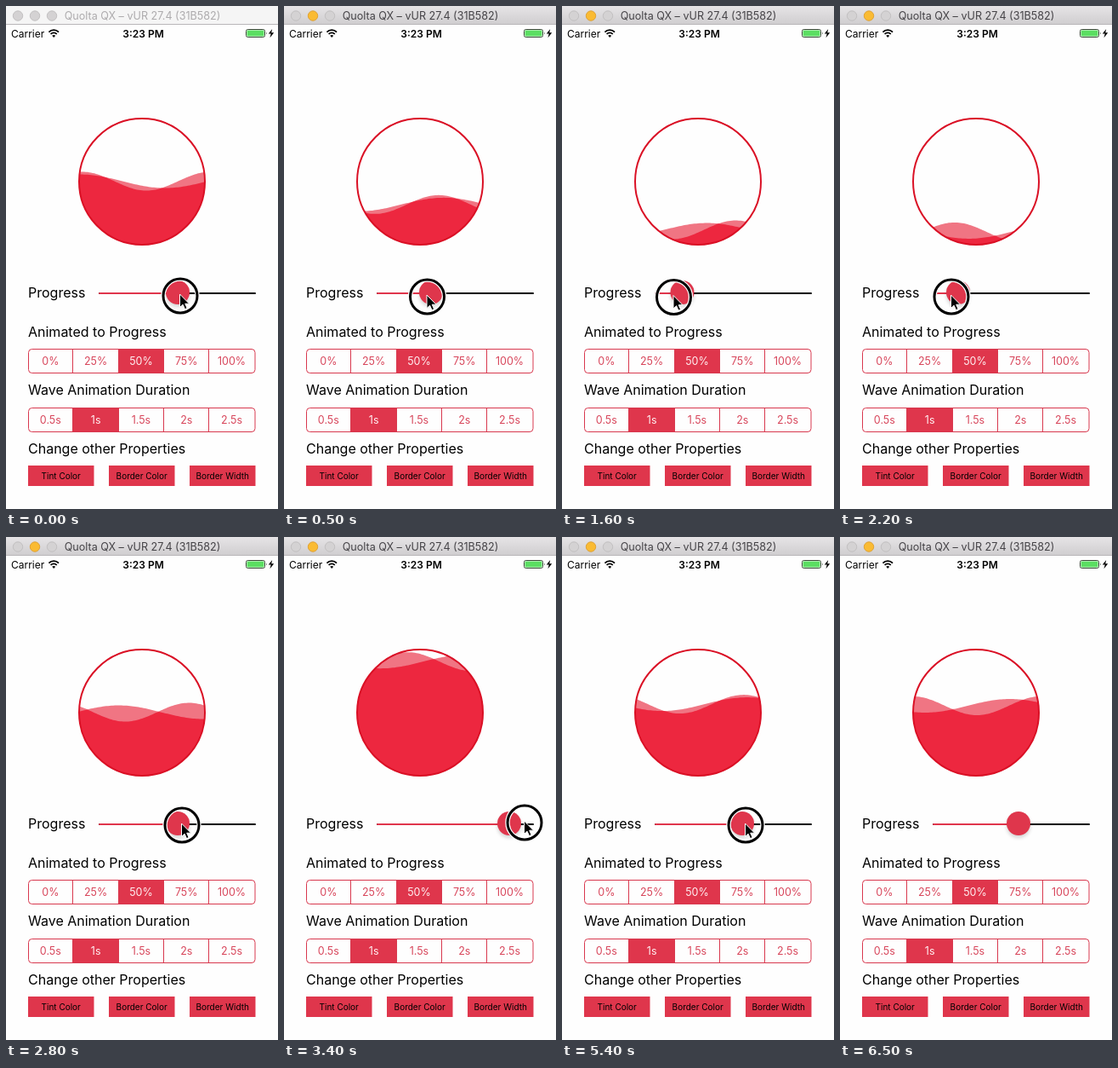
Write an HTML page that moves like this. It is 320 px wide and 590 px high and loops after 6600 ms.

```html
<!DOCTYPE html>
<html lang="en">
<head>
<meta charset="utf-8">
<title>Wave progress</title>
<style>
  html, body { margin: 0; width: 100%; height: 100%; overflow: hidden; background: #fefefe; }
  svg { display: block; width: 320px; height: 590px; font-family: Inter, Roboto, sans-serif; }
  .mid { text-anchor: middle; }
  .label { font-size: 16px; }
  .seg { font-size: 12.5px; fill: #d8475c; text-anchor: middle; }
  .seg.on { fill: #fff0f2; }
  .btn { font-size: 10px; text-anchor: middle; }
</style>
</head>
<body>
<svg viewBox="0 0 320 590">
  <defs>
    <linearGradient id="bar" x2="0" y2="1">
      <stop offset="0" stop-color="#e6e4e6"/>
      <stop offset="1" stop-color="#d0ced0"/>
    </linearGradient>
    <clipPath id="bowl"><circle cx="160" cy="206" r="74"/></clipPath>
    <filter id="soft" x="-50%" y="-50%" width="200%" height="200%"><feGaussianBlur stdDeviation="2"/></filter>
  </defs>
  <rect width="320" height="590" fill="#fefefe"/>

  <rect id="title" width="320" height="21"/>
  <rect y="21" width="320" height="1" fill="#b8b6b8"/>
  <g stroke-width="1">
    <circle cx="14" cy="11.5" r="5.7" fill="#d4d2d3" stroke="#c1bfc0"/>
    <circle id="mini" cx="34" cy="11.5" r="5.7"/>
    <circle cx="54" cy="11.5" r="5.7" fill="#d4d2d3" stroke="#c1bfc0"/>
  </g>
  <text id="name" class="mid" x="160.5" y="16" font-size="12.6">Quolta QX – vUR 27.4 (31B582)</text>

  <text x="6" y="37" font-size="12">Carrier</text>
  <g fill="none" stroke="#000" stroke-width="1.8">
    <path d="M50.4 30.6a8 8 0 0 1 11.6 0M52.6 33a5 5 0 0 1 7.2 0"/>
    <path d="M56.2 37l-2-2.2a3 3 0 0 1 4 0z" fill="#000" stroke="none"/>
  </g>
  <text class="mid" x="161.5" y="37" font-size="12" font-weight="600">3:23 PM</text>
  <rect x="282.5" y="27.5" width="22" height="9" rx="2" fill="#fefefe" stroke="#3a4a38"/>
  <rect x="283.5" y="28.5" width="20" height="7" rx="1" fill="#5bde62"/>
  <path d="M306 30.5q1.6 1.5 0 3z" fill="#3a4a38"/>
  <path d="M313.2 27l-4.4 5.6h2.9l-1.2 4.6 4.7-6h-3z"/>

  <g clip-path="url(#bowl)">
    <path id="pale" fill="#f07583"/>
    <path id="deep" fill="#ed273f"/>
  </g>
  <circle cx="160" cy="206" r="74" fill="none" stroke="#da1025" stroke-width="2"/>

  <text class="label" x="26" y="342">Progress</text>
  <rect x="109" y="336" width="185" height="2" rx="1"/>
  <rect id="track" x="109" y="336" height="2" rx="1" fill="#e0364c"/>
  <g id="thumb">
    <circle cy="3" r="14" opacity=".16" filter="url(#soft)"/>
    <circle r="14" fill="#df364c"/>
  </g>

  <text class="label" x="26" y="388">Animated to Progress</text>
  <text class="label" x="26" y="456">Wave Animation Duration</text>
  <text class="label" x="26" y="525">Change other Properties</text>
  <g id="controls"></g>

  <g id="pointer">
    <g fill="none">
      <circle r="20" stroke="#fefefe" stroke-width="5.5"/>
      <circle r="20" stroke="#000" stroke-width="3"/>
    </g>
    <path d="M-.5-2v15.5l3.6-3.3 2.4 5.4 2.6-1.1-2.4-5.3h4.9z" stroke="#fefefe" stroke-width="1" stroke-linejoin="round"/>
  </g>
</svg>
<script>
const LOOP = 6600, STEP = 100;
const $ = id => document.getElementById(id);
const NS = 'http://www.w3.org/2000/svg';
const controls = $('controls');

function add(tag, attrs, text) {
  const el = document.createElementNS(NS, tag);
  for (const k in attrs) el.setAttribute(k, attrs[k]);
  if (text) el.textContent = text;
  controls.append(el);
}

function segments(top, height, names, chosen) {
  const left = 26.5, w = 53.3;
  add('rect', { x: Math.floor(left + chosen * w) - 1, y: top, width: 54, height, fill: '#df364c' });
  names.forEach((name, i) => {
    if (i) add('rect', { x: Math.floor(left + i * w) - 1, y: top, width: 1, height, fill: '#d8384e' });
    add('text', { x: left + (i + .5) * w - .8, y: top + height / 2 + 4.5, class: i === chosen ? 'seg on' : 'seg' }, name);
  });
  add('rect', { x: left, y: top, width: w * 5, height, rx: 4, fill: 'none', stroke: '#d8384e' });
}

segments(402.5, 28, ['0%', '25%', '50%', '75%', '100%'], 2);
segments(471.5, 28, ['0.5s', '1s', '1.5s', '2s', '2.5s'], 1);
['Tint Color', 'Border Color', 'Border Width'].forEach((name, i) => {
  const x = 26 + i * 95;
  add('rect', { x, y: 539, width: 77.5, height: 24, fill: '#df364c' });
  add('text', { x: x + 38.7, y: 554.5, class: 'btn' }, name);
});

// time, thumb x, pointer x, pointer y
const drag = [
  [0, 202, 205, 340],
  [1000, 144, 132, 342],
  [2200, 139, 131, 341],
  [3400, 265, 283, 335],
  [4400, 272, 286, 336],
  [5400, 212, 216, 338],
  [5700, 210, 214, 338],
  [6600, 210, 214, 338]
];

function dragAt(t) {
  const i = drag.findIndex(k => k[0] > t);
  const a = drag[i - 1], b = drag[i];
  const u = (t - a[0]) / (b[0] - a[0]), e = u * u * (3 - 2 * u);
  return a.map((v, n) => v + (b[n] - v) * e).slice(1);
}

// Two swells drift left, each with its own length and speed
const swells = [
  { amp: 8, len: 200, low: 187, speed: .198 },
  { amp: 11, len: 150, low: 165, speed: .116 }
];

const height = (s, x, t) => s.amp * Math.cos((x - s.low + s.speed * t) * 2 * Math.PI / s.len);

function water(pick, level, t) {
  let d = 'M84 282';
  for (let x = 84; x <= 236; x += 2)
    d += `L${x} ${(level + pick(...swells.map(s => height(s, x, t)))).toFixed(2)}`;
  return d + 'L236 282Z';
}

function draw(t) {
  const active = t >= 100;
  $('title').setAttribute('fill', active ? 'url(#bar)' : '#f5f5f5');
  $('name').setAttribute('fill', active ? '#454347' : '#adabad');
  $('mini').setAttribute('fill', active ? '#fabb33' : '#d4d2d3');
  $('mini').setAttribute('stroke', active ? '#dfa032' : '#c1bfc0');

  const [thumb, px, py] = dragAt(t);
  $('track').setAttribute('width', thumb - 109);
  $('thumb').setAttribute('transform', `translate(${thumb} 336)`);
  $('pointer').setAttribute('transform', `translate(${px} ${py})`);
  $('pointer').setAttribute('visibility', t < 5900 ? 'visible' : 'hidden');

  const level = 280 - 148 * (thumb - 123) / 157;
  $('pale').setAttribute('d', water(Math.min, level, t));
  $('deep').setAttribute('d', water(Math.max, level, t));
}

const start = performance.now();
function tick() {
  const t = (performance.now() - start) % LOOP;
  draw(Math.floor(t / STEP) * STEP);
  requestAnimationFrame(tick);
}
tick();
</script>
</body>
</html>
```
